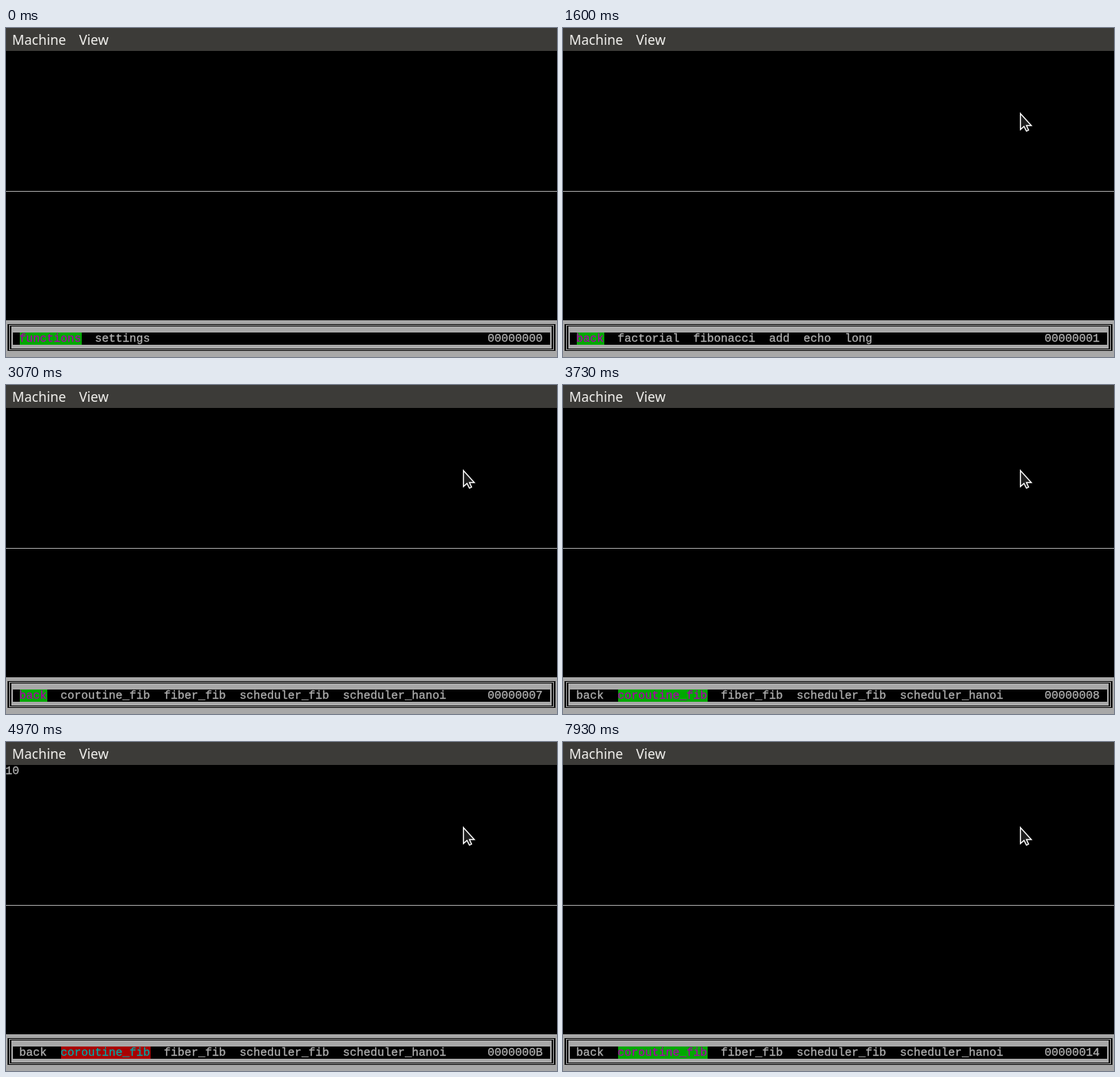
An HTML page that plays this animation: 720x430 px, repeating every 8000 ms.

```html
<!DOCTYPE html>
<html lang="en">
<head>
<meta charset="utf-8">
<title>Text mode menu</title>
<style>
  html, body { margin: 0; width: 100%; height: 100%; overflow: hidden; background: #000; }
  svg { display: block; width: 720px; height: 430px; }
  text { white-space: pre; }
  .bar { font: 17.6px "Noto Sans", "Open Sans", sans-serif; fill: #f2f1ee; }
  .tty { font: 15px "Liberation Mono", monospace; fill: #b2b2b2; stroke: #b2b2b2; stroke-width: .3; }
  .tty .green { fill: #a800a8; stroke: #a800a8; }
  .tty .red { fill: #00a8a8; stroke: #00a8a8; }
  rect.green { fill: #00a800; }
  rect.red { fill: #a80000; }
</style>
</head>
<body>
<svg viewBox="0 0 720 430">
  <rect width="720" height="430"/>
  <rect width="720" height="30" fill="#3c3b38"/>
  <text class="bar" x="8" y="22">Machine</text>
  <text class="bar" x="95.5" y="22">View</text>

  <g shape-rendering="crispEdges">
    <rect y="213" width="720" height="1" fill="#a8a8a8"/>
    <rect y="382" width="720" height="48" fill="#a8a8a8"/>
    <path fill-rule="evenodd" d="M2 387H718V422H2Z M4 388V421H716V388Z
      M5 389H715V420H5Z M7 390V419H713V390Z"/>
    <rect x="9" y="398" width="702" height="16"/>
    <rect id="mark" y="398" height="16"/>
    <rect id="caret" y="44" width="9" height="2" fill="#a8a8a8"/>
  </g>

  <g class="tty" transform="translate(-.7 0)">
    <text id="input" x="0" y="42"></text>
    <g id="items"></g>
    <text id="count" x="630" y="410"></text>
  </g>

  <path id="pointer" fill="#1e1e1e" stroke="#fff" stroke-width="1.4" stroke-linejoin="miter"
    d="M.7 1.2V22.3L5.4 18.2L8.6 24.3L11.4 23L8.6 17H15Z"/>
</svg>
<script>
const LOOP = 8000, CELL = 9, BLINK = 267;
const $ = id => document.getElementById(id);

const MENUS = [
  "functions settings",
  "back factorial fibonacci add echo long",
  "back coroutine_fib fiber_fib scheduler_fib scheduler_hanoi"
].map(s => s.split(" "));

// Each key press: time, menu, selected item
const KEYS = [
  [0, 0, 0], [1100, 1, 0], [1760, 1, 1], [2000, 1, 2], [2270, 1, 3],
  [2490, 1, 4], [2700, 1, 5], [2940, 2, 0], [3500, 2, 1], [4230, 2, 1]
];
const OPEN = 4230, CLOSE = 7850;
const DIGIT_START = 4750, DIGIT_STEP = 205, DIGITS = "1000000000";
const BLINK_START = 4567;
const MOVE = { start: 30, end: 530, from: [716, 290], to: [597, 110.5] };

let shown = "";

function drawMenu(menu, pick, tone) {
  const key = [menu, pick, tone].join();
  if (key === shown) return;
  shown = key;
  $("items").replaceChildren();
  let col = 2;
  MENUS[menu].forEach((word, i) => {
    const t = document.createElementNS("http://www.w3.org/2000/svg", "text");
    t.textContent = word;
    t.setAttribute("x", col * CELL);
    t.setAttribute("y", 410);
    if (i === pick) {
      t.setAttribute("class", tone);
      $("mark").setAttribute("class", tone);
      $("mark").setAttribute("x", col * CELL);
      $("mark").setAttribute("width", word.length * CELL);
    }
    $("items").append(t);
    col += word.length + 2;
  });
}

function drawPointer(t) {
  const p = Math.min(1, Math.max(0, (t - MOVE.start) / (MOVE.end - MOVE.start)));
  const e = 1 - (1 - p) ** 2;
  const [x, y] = MOVE.from.map((a, i) => a + (MOVE.to[i] - a) * e);
  $("pointer").setAttribute("transform", `translate(${x} ${y})`);
  $("pointer").setAttribute("visibility", t < MOVE.start ? "hidden" : "visible");
}

function draw(t) {
  const step = KEYS.filter(k => k[0] <= t).length - 1;
  const running = t >= OPEN && t < CLOSE;
  const typed = Math.max(0, Math.min(DIGITS.length,
    Math.floor((t - DIGIT_START) / DIGIT_STEP) + 1));
  const presses = step + typed + (t >= CLOSE ? 1 : 0);
  const blinkOn = t >= BLINK_START && Math.floor((t - BLINK_START) / BLINK) % 2 === 0;

  drawMenu(KEYS[step][1], KEYS[step][2], running ? "red" : "green");
  $("input").textContent = running ? DIGITS.slice(0, typed) : "";
  $("count").textContent = presses.toString(16).toUpperCase().padStart(8, "0");
  $("caret").setAttribute("visibility", running && blinkOn ? "visible" : "hidden");
  drawPointer(t);
}

const start = performance.now();
function tick() {
  draw((performance.now() - start) % LOOP);
  requestAnimationFrame(tick);
}
tick();
</script>
</body>
</html>
```
